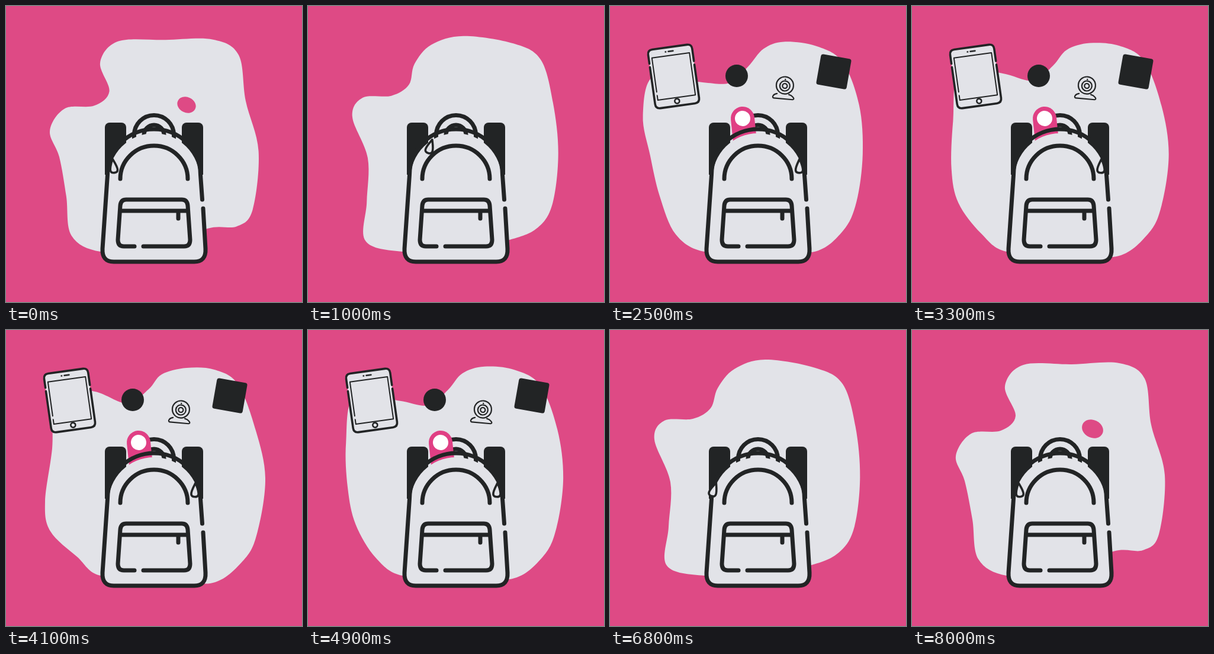
An HTML page with a canvas that plays this animation: 500 px wide and 500 px high, repeating every 8100 ms.

```html
<!DOCTYPE html>
<html lang="en">
<head>
<meta charset="utf-8">
<title>Backpack</title>
<style>
html, body { margin: 0; width: 100%; height: 100%; overflow: hidden; background: #de4a85; }
canvas { display: block; width: 100vw; height: 100vh; }
</style>
</head>
<body>
<canvas id="stage" width="500" height="500"></canvas>
<script>
const ctx = document.getElementById('stage').getContext('2d');
const LOOP = 8100, STEP = 100;
const PINK = '#de4a85', LIGHT = '#e2e3e8', DARK = '#222425';

const clamp = x => Math.max(0, Math.min(1, x));
const mix = (a, b, k) => a + (b - a) * k;
const smooth = x => x * x * (3 - 2 * x);
const backIn = x => 2.70158 * x ** 3 - 1.70158 * x ** 2;
const backOut = x => 1 - backIn(1 - x);

// Blob outline, clockwise x, y: the left side moves a lot, the right side little.
const leftKeys = {
  0: [112,387, 102,320, 89,255, 74,213, 100,175, 150,170, 175,145, 157,95, 188,59, 270,58],
  1200: [96,398, 99,332, 102,257, 75,185, 92,153, 140,150, 170,132, 182,98, 210,66, 262,50],
  1800: [105,398, 92,340, 96,265, 64,182, 85,145, 150,139, 186,127, 212,98, 236,68, 278,53],
  2450: [110,386, 85,319, 68,248, 53,183, 73,120, 157,132, 203,130, 233,102, 259,72, 292,60],
  3900: [120,383, 75,340, 66,290, 78,200, 85,100, 150,104, 205,124, 241,100, 263,75, 305,64]
};
const rightKeys = {
  0: [350,56, 393,82, 404,160, 427,245, 417,345, 390,372, 340,374],
  1800: [345,68, 393,96, 420,165, 420,250, 411,325, 388,375, 342,408],
  3900: [352,67, 392,92, 422,170, 438,250, 425,340, 402,388, 345,428]
};
const base = [250, 412, 160, 415];

function morph(keys, u) {
  const times = Object.keys(keys).map(Number);
  let i = 0;
  while (i < times.length - 2 && u > times[i + 1]) i++;
  const [from, to] = [times[i], times[i + 1]];
  const k = clamp((u - from) / (to - from));
  return keys[from].map((n, j) => mix(n, keys[to][j], k));
}

function stroke(path, width, fill) {
  const p = new Path2D(path);
  if (fill) { ctx.fillStyle = fill; ctx.fill(p); }
  ctx.strokeStyle = DARK;
  ctx.lineWidth = width;
  ctx.stroke(p);
}

function box(x, y, w, h, r, fill) {
  ctx.beginPath();
  ctx.roundRect(x, y, w, h, r);
  ctx.fillStyle = fill;
  ctx.fill();
}

function disc(x, y, r, fill, width) {
  ctx.beginPath();
  ctx.arc(x, y, r, 0, 7);
  if (fill) { ctx.fillStyle = fill; ctx.fill(); }
  if (width) { ctx.strokeStyle = DARK; ctx.lineWidth = width; ctx.stroke(); }
}

function place(x, y, deg, draw) {
  ctx.save();
  ctx.translate(x, y);
  ctx.rotate(deg * Math.PI / 180);
  draw();
  ctx.restore();
}

function drawBlob(t) {
  const s = (t + 100) % LOOP, u = Math.min(s, LOOP - s);
  const v = [...morph(leftKeys, u), ...morph(rightKeys, u), ...base];
  const at = j => v[(j + v.length) % v.length];
  const ahead = j => at(j) + (at(j + 2) - at(j - 2)) / 6;
  const behind = j => at(j) - (at(j + 2) - at(j - 2)) / 6;
  ctx.beginPath();
  ctx.moveTo(v[0], v[1]);
  for (let j = 0; j < v.length; j += 2) {
    ctx.bezierCurveTo(ahead(j), ahead(j + 1), behind(j + 2), behind(j + 3), at(j + 2), at(j + 3));
  }
  ctx.fillStyle = LIGHT;
  ctx.fill();

  const hole = Math.sqrt(Math.max(0, 1 - u / 420));
  if (hole) place(305, 167, 25, () => {
    ctx.beginPath();
    ctx.ellipse(0, 0, 18.5 * hole, 15 * hole, 0, 0, 7);
    ctx.fillStyle = PINK;
    ctx.fill();
  });
}

function tablet() {
  box(-37.5, -50, 75, 100, 8, LIGHT);
  stroke('M-37.5 -27V-42Q-37.5 -50 -29.5 -50H29.5Q37.5 -50 37.5 -42V-21M37.5 -15V42Q37.5 50 29.5 50H-29.5Q-37.5 50 -37.5 42V-21', 3.6);
  stroke('M-32 22V-36H32V36H-32V28', 2);
  stroke('M-3 -43H5M-8 -43H-7.5', 2.6);
  disc(0, 42, 4, LIGHT, 2.6);
}

function webcam() {
  stroke('M-12 10C-18 11 -21 17 -17 18H15C20 17 14 11 8 10', 2.2, LIGHT);
  disc(0, -5, 14.5, LIGHT, 2.2);
  disc(0, -4, 8.5, null, 2.2);
  disc(0, -4, 4, null, 2.2);
  disc(0, -15, 1.2, DARK);
}

function tag() {
  box(-20, -20, 40, 90, [20, 20, 0, 0], '#e03f84');
  disc(0, 0, 13, '#fff');
}

// from / to: x, y, angle; out / back: start times of the two moves
const items = [
  { draw: tag, from: [232, 272, -20], to: [224, 190, -6], out: 1600, back: 5720 },
  { draw: tablet, from: [230, 310, -90], to: [107.5, 119, -8], out: 1080, back: 5880, flat: true },
  { draw: () => disc(0, 0, 19, DARK), from: [245, 260, 0], to: [214, 118, 0], out: 1140, back: 5860 },
  { draw: webcam, from: [265, 250, 30], to: [295, 139, 5], out: 1595, back: 5740 },
  { draw: () => box(-26, -26, 52, 52, 4, DARK), from: [270, 300, -16], to: [378, 111, 10], out: 1655, back: 5550 }
];

function drawItem(item, t) {
  const inward = t >= item.back;
  const x = clamp((t - (inward ? item.back : item.out)) / 700);
  if (t < item.out || inward && x === 1) return;
  const k = inward ? 1 - backIn(x) : backOut(x);
  const kx = !item.flat ? k : 1 - (inward ? x : 1 - x) ** 2;
  const [px, py, deg] = item.to.map((n, i) => mix(item.from[i], n, i ? k : kx));
  place(px, py, deg, item.draw);
}

const swing = ms => ms < 0 ? 0 : 38 * Math.exp(-ms / 300) * Math.sin(ms * Math.PI / 200);

function drawPull(t) {
  const open = clamp((t - 700) / 900), shut = clamp((t - 5800) / 900);
  const k = smooth(open) - smooth(shut);
  const a = mix(207, 333, k) * Math.PI / 180;
  const drag = 25 * (Math.sin(open * Math.PI) - Math.sin(shut * Math.PI));
  const deg = mix(-8, 4, k) + drag - swing(t - 1600) + swing(t - 6700) + swing(t - 5600) * 0.4;
  place(250 + 79 * Math.cos(a), 293 + 79 * Math.sin(a), deg,
    () => stroke('M0 1C-3 8 -7 16 -6 21C-5 26 5 26 6 21C7 16 3 8 0 1Z', 3.6, LIGHT));
}

function drawBack() {
  box(167, 197, 36, 88, [8, 8, 0, 0], DARK);
  box(297, 197, 36, 88, [8, 8, 0, 0], DARK);
  stroke('M216.5 225V218A33.5 33.5 0 0 1 283.5 218V225', 7);
  stroke('M233 225V218A17 17 0 0 1 267 218V225', 7);
}

function drawBag() {
  ctx.fillStyle = LIGHT;
  ctx.fill(new Path2D('M173 292A77 77 0 0 1 327 292L337 410Q338 432 318 432H182Q162 432 163 410Z'));
  stroke('M331.5 327L328.5 285A78.5 77 0 0 0 171.5 285L163 410Q162 432 182 432H318Q338 432 337 410L333 342', 7);
  stroke('M193 292A57 56 0 0 1 307 292', 7);
  stroke('M217 406H199Q189 406 189 395L193 337Q194 327 203 327H297Q306 327 307 337L311 395Q311 406 301 406H232', 7);
  stroke('M194 346H306M291 348V359', 7);
}

const start = performance.now();

function frame() {
  const t = Math.floor((performance.now() - start) % LOOP / STEP) * STEP;
  ctx.lineCap = ctx.lineJoin = 'round';
  ctx.fillStyle = PINK;
  ctx.fillRect(0, 0, 500, 500);
  drawBlob(t);
  drawBack();
  items.forEach(item => drawItem(item, t));
  drawBag();
  drawPull(t);
  requestAnimationFrame(frame);
}
frame();
</script>
</body>
</html>
```
